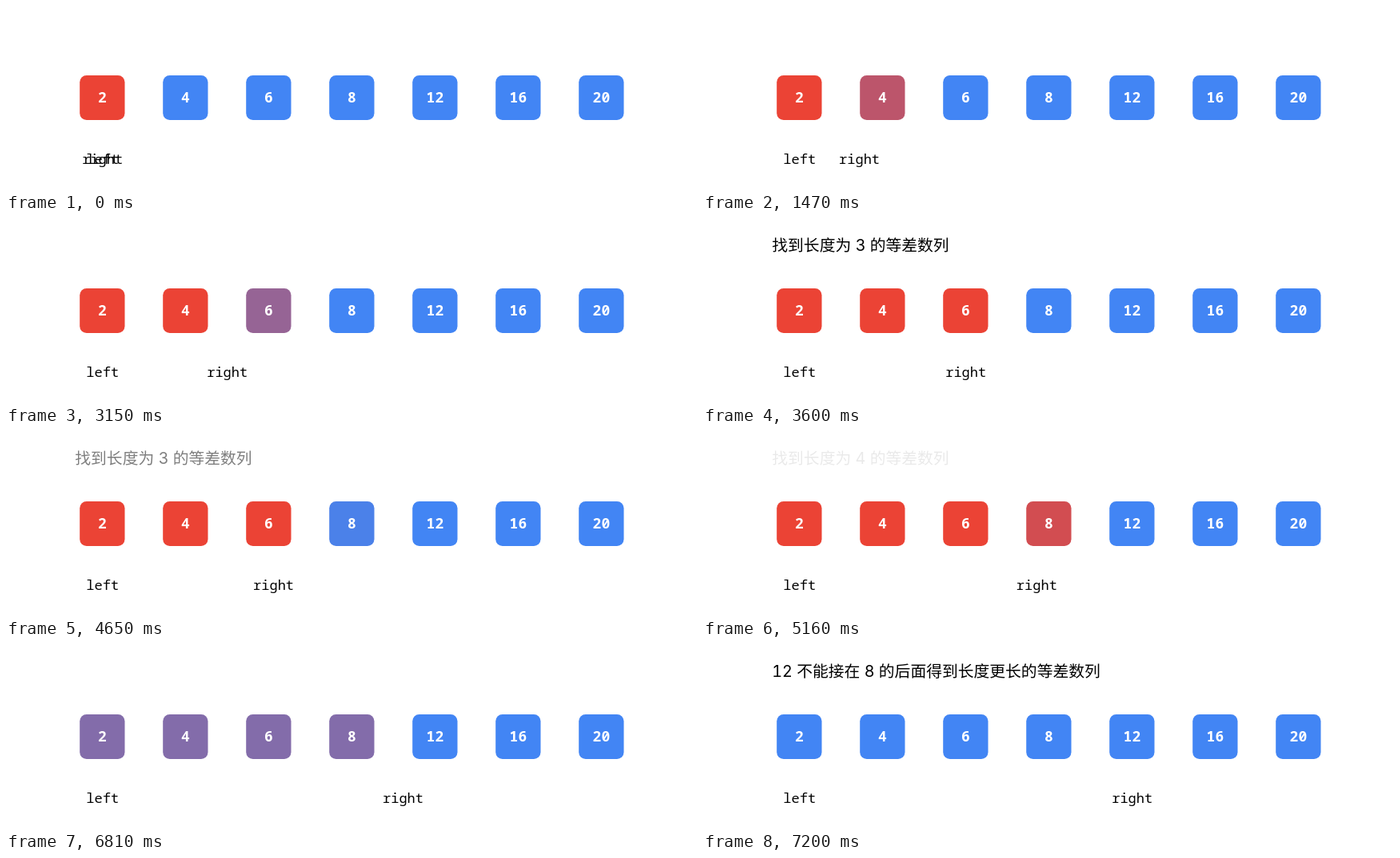
Animation of 864x232 px, one loop 8000 ms. Source, as an HTML page:

```html
<!DOCTYPE html>
<html lang="zh-CN">
<head>
<meta charset="utf-8">
<style>
  html, body { margin: 0; height: 100%; overflow: hidden; background: #fff; }
  svg { display: block; width: 864px; height: 232px; }
  .title { font: 19.8px Inter, "Noto Sans CJK SC", "Noto Sans CJK", sans-serif; font-variant-numeric: tabular-nums; }
  .label { font: 17px "Noto Sans Mono", monospace; text-anchor: middle; }
  .num { font: bold 18px "Noto Sans Mono", monospace; text-anchor: middle; fill: #fff; }
</style>
</head>
<body>
<svg id="stage" viewBox="0 0 864 232"></svg>
<script>
const LOOP = 8000, TICK = 30, PERIOD = 1800, MOVE = 900;
const BLUE = [66, 133, 244], RED = [235, 67, 53];
const numbers = [2, 4, 6, 8, 12, 16, 20];
const titles = [
  '',
  ...[2, 3, 4].map(n => `找到长度为 ${n} 的等差数列`),
  '12 不能接在 8 的后面得到长度更长的等差数列'
];
const stage = document.getElementById('stage');

function add(tag, attrs, text = '') {
  const el = document.createElementNS('http://www.w3.org/2000/svg', tag);
  for (const key in attrs) el.setAttribute(key, attrs[key]);
  el.textContent = text;
  return stage.appendChild(el);
}

const center = i => 120.4 + 104 * i;
const clamp = x => Math.min(1, Math.max(0, x));
const mix = (a, b, k) => a + (b - a) * k;

// cubic-bezier(.42, 0, .58, 1)
function ease(x) {
  let lo = 0, hi = 1;
  for (let i = 0; i < 24; i++) {
    const s = (lo + hi) / 2, r = 1 - s;
    if (1.26 * r * r * s + 1.74 * r * s * s + s * s * s < x) lo = s;
    else hi = s;
  }
  return lo * lo * (3 - 2 * lo);
}

const boxes = numbers.map((n, i) => {
  const box = add('rect', { x: center(i) - 28.2, y: 87, width: 56.3, height: 56, rx: 8.5 });
  add('text', { class: 'num', x: center(i), y: 121 }, n);
  return box;
});
const title = add('text', { class: 'title', x: 86.3, y: 40 });
add('text', { class: 'label', x: center(0) + 0.3, y: 198 }, 'left');
const right = add('text', { class: 'label', y: 198 }, 'right');

// The last state clears every highlight.
const isRed = (i, state) => state < 4 && i <= state ? 1 : 0;

function draw(time) {
  const t = Math.floor(time % LOOP / TICK) * TICK;
  const from = Math.min(3, Math.floor(t / PERIOD)), to = from + 1;
  const p = clamp((t - from * PERIOD - (PERIOD - MOVE)) / MOVE);
  const e = p === 1 ? 1 : ease(p);

  boxes.forEach((box, i) => {
    const k = mix(isRed(i, from), isRed(i, to), e);
    box.setAttribute('fill', `rgb(${BLUE.map((c, j) => Math.round(mix(c, RED[j], k)))})`);
  });
  right.setAttribute('x', center(from + e) + 0.3);

  // Old title fades out in the first third, the new one in during the last.
  const entering = p > 0.5;
  title.textContent = titles[entering ? to : from];
  title.setAttribute('opacity', entering ? ease(clamp(3 * p - 2)) : 1 - ease(clamp(3 * p)));
}

const start = performance.now();
function frame() {
  draw(performance.now() - start);
  requestAnimationFrame(frame);
}
frame();
</script>
</body>
</html>
```
